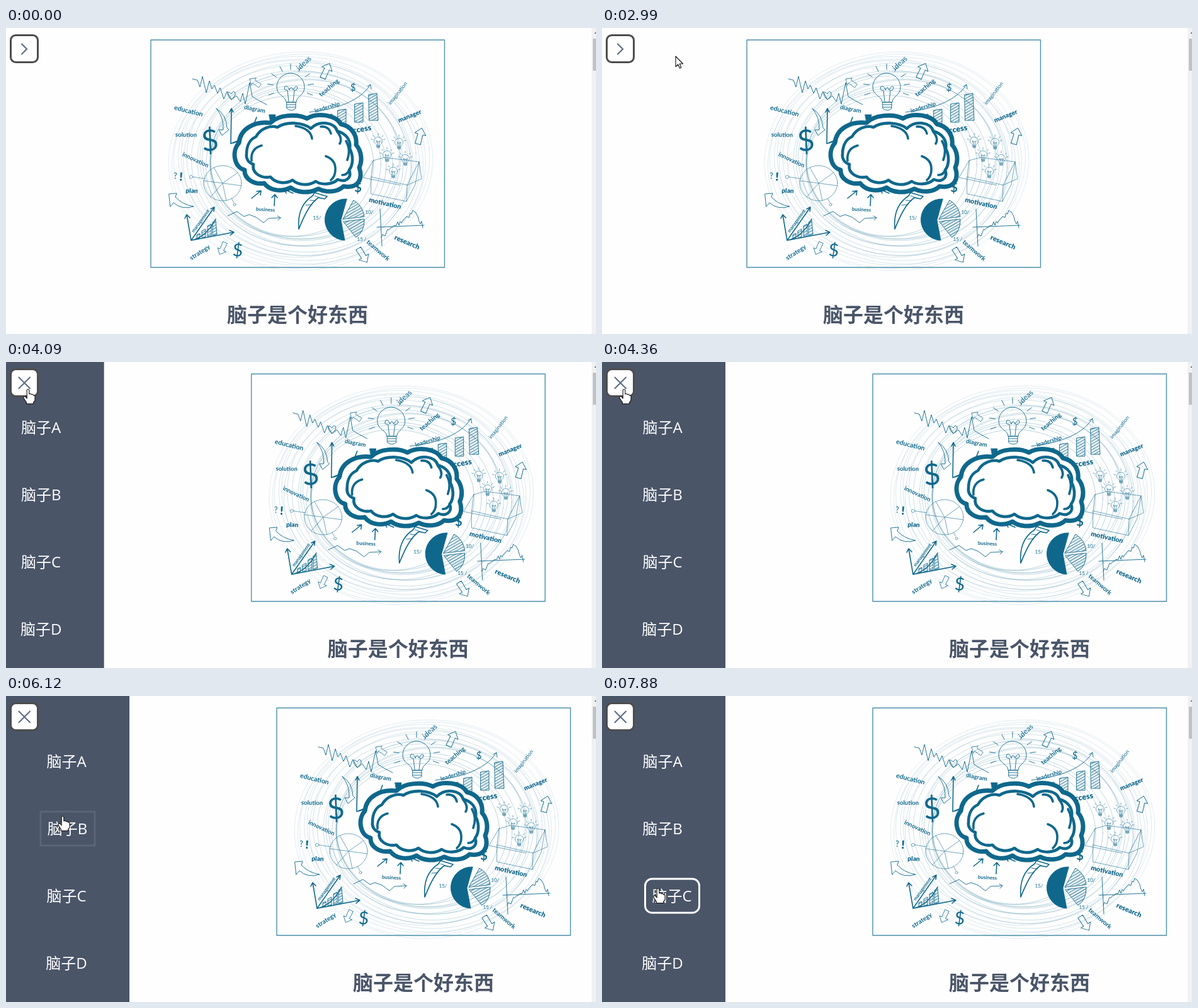
Recreate the animation shown at these times as an HTML page. Size 937x487 px, loop 8000 ms.

```html
<!DOCTYPE html>
<html lang="zh">
<head>
<meta charset="utf-8">
<title>脑子是个好东西</title>
<style>
html, body { margin: 0; width: 100%; height: 100%; overflow: hidden; background: #fefefe; }
svg { display: block; }
text { font-family: "Open Sans", "Noto Sans CJK SC", "Noto Sans CJK", sans-serif; }
#sketch { fill: none; stroke: #0f688c; stroke-width: .9; stroke-linejoin: round; stroke-linecap: round; }
#sketch text { font-family: Lato, sans-serif; fill: #0f688c; stroke: none; text-anchor: middle; }
.light { opacity: .65; }
.bold { stroke-width: 1.6; }
.solid { fill: #0f688c; }
.hatch { fill: url(#hatch); }
.item text { fill: #fff; font-size: 24px; text-anchor: middle; }
.item rect { fill: none; stroke: #fff; stroke-width: 3; }
#cursor path { fill: #fff; stroke: #111; stroke-width: 1.1; stroke-linejoin: round; }
</style>
</head>
<body>
<svg width="937" height="487" viewBox="0 0 937 487">
  <defs>
    <pattern id="hatch" width="4" height="4" patternUnits="userSpaceOnUse" patternTransform="rotate(-30)">
      <path d="M0 2H4" stroke="#0f688c" stroke-width="1"/>
    </pattern>
    <path id="block" d="M0-14L9-4L4-4L4.5 12L-4.5 12L-4-4L-9-4Z"/>
    <g id="bulb">
      <path d="M-7 24C-7 14-22 14-22 0A22 22 0 0 1 22 0C22 14 9 14 9 24Z"/>
      <path d="M-6 24H8V34Q1 40-6 34ZM-6 28H8M-6 32H8"/>
      <path d="M-3 23L-5 5Q-12 6-9-1Q-4-3-2 5Q1-4 4 5Q8-4 11 0Q11 6 6 5L4 23"/>
    </g>
  </defs>

  <g id="page">
    <g id="sketch">
      <g id="rings" stroke-width=".8"></g>
      <rect x="230" y="19" width="466.5" height="362" stroke="#4b90a9" stroke-width="1.4"/>

      <path d="M296 81L304 83L308 94L312 77L318 103L323 84L327 97L331 91L336 104L340 95L346 113L351 101L358 114Q367 106 363 102Q360 100 358 105Q352 99 352 105Q352 109 358 114L366 108L372 117L376 104L380 121L387 87L391 109L399 114L414 122"/>
      <path d="M334 128Q350 138 351 159L354 162L343 171L338 162L345 162Q346 142 334 128Z"/>
      <path d="M259 264L271 263L269 269Q280 281 298 284Q279 290 266 278L261 284Z"/>
      <path class="bold" d="M465 320C463 296 470 278 487 267L490 262L510 268L506 272L496 270C482 280 473 300 465 320Z"/>
      <path d="M476 282L486 281M482 274L492 275M490 267L501 271"/>

      <use href="#bulb" x="452" y="94"/>
      <g id="rays"></g>
      <g id="bulbs" class="light"></g>
      <path class="light" d="M580 237L637 250L636 276L580 264ZM637 250L656 213L650 249L636 276M580 237L583 211L601 206L656 213M583 211L567 238L626 250M656 213L660 240L637 250"/>

      <path class="bold" d="M357 184L358 128L355 134M358 128L361 134M357 184L384 173M361 183Q386 176 398 142"/>
      <path class="solid" d="M418 138H428L426 149H420Z"/>
      <path class="hatch" d="M510 138L518 137V155H510ZM527 131L540 129V152H527ZM554 121L567 119V150H554ZM576 106L589 104L591 147H577Z"/>
      <path d="M482 134Q556 126 579 90L574 93M579 90L580 97"/>

      <g class="light">
        <ellipse cx="344" cy="247" rx="30" ry="28"/>
        <path d="M344 247L330 222M344 247L368 230M344 247L374 251M344 247L350 275M344 247L325 269M344 247L314 243M297 237L316 240M358 271L362 278"/>
        <circle cx="294" cy="237" r="2.5"/><circle cx="363" cy="281" r="2"/>
      </g>
      <path class="bold" d="M390 271L405 259M398 260L405 259L404 266M426 283L427 265M422 270L427 265L431 270M456 263L442 257M448 256L442 257L445 263"/>
      <path d="M352 299L367 292L378 300L386 297L397 301L409 310L417 303L436 302M431 299L436 302L432 306"/>

      <path class="solid" d="M541 272A33 33 0 1 0 538 338L532 306Z"/>
      <path class="hatch" d="M535 304L552 274Q567 283 569 300ZM536 308L569 304Q570 324 556 333Z"/>

      <path d="M594 288L597 347M589 317L664 314"/>
      <path id="noise"/>
      <path class="bold" d="M294 338L287 297L284 303M287 297L292 302M294 338L362 325L355 322M362 325L356 330M294 338L331 285L325 288M331 285L330 292M294 338Q318 333 333 304"/>
      <path class="hatch" d="M303 335V329L308 327V334ZM311 333V323L317 320V332ZM320 331V315L326 312V330ZM328 330V309L333 306L335 328Z"/>

      <g id="blocks"></g>
      <g id="words"></g>

      <path fill="#fff" stroke-width="7" d="M370 183C372 160 395 148 420 151C432 138 462 136 478 144C494 134 524 138 532 153C548 156 558 170 556 186C565 196 566 212 561 222C567 240 560 256 536 252C526 262 508 262 496 256C480 264 462 262 452 254C436 262 418 258 410 247C394 250 378 240 379 226C362 222 358 196 370 183Z"/>
      <path stroke-width="4.6" d="M382 201C382 184 390 176 397 173C404 160 420 154 431 158C446 148 472 150 484 160C498 146 522 150 526 164C540 168 548 178 546 192C553 206 550 220 545 226C550 240 538 246 527 241C518 250 500 250 492 244C480 252 464 250 455 242C444 249 428 247 420 237C404 240 390 230 393 217C384 214 381 207 382 201Z"/>
      <path stroke-width="3.6" d="M390 211Q388 192 406 187M460 156Q484 160 486 176M500 157Q513 156 516 168M526 165Q535 176 530 184M540 180Q548 194 542 210M508 204Q524 210 523 226Q523 236 516 242M545 226Q542 234 534 234"/>
    </g>
    <text x="463" y="468" font-size="32" font-weight="700" fill="#4a5568" text-anchor="middle">脑子是个好东西</text>
  </g>

  <g id="side"><rect width="196" height="487" fill="#4a5568"/></g>

  <rect x="7.5" y="11.5" width="43" height="43" rx="8" fill="#fff" stroke="#4d4d4d" stroke-width="3"/>
  <path id="icon" fill="none" stroke="#5f6f86" stroke-width="2.2" stroke-linecap="round"/>

  <rect x="930" width="7" height="487" fill="#f1f1f1"/>
  <rect x="932" y="17" width="5" height="51" fill="#c1c1c1"/>
  <path d="M934 9L937 6V9Z" fill="#777"/>

  <g id="cursor">
    <path id="arrow" d="M0 0V16.5L3.8 13L6.4 19L8.8 18L6.3 12H11.5Z"/>
    <path id="hand" d="M-1.8 13V1.6Q0-1 1.8 1.6V8Q4 6.6 5.2 8.8Q7.4 7.6 8.4 10Q11 9.4 11 12V17Q11 20 8.6 21V23.5H-2.6V21Q-5 18-6.8 14.5Q-8 11.5-5.4 11.6Q-3.6 12-1.8 15Z"/>
  </g>
</svg>
<script>
const $ = id => document.getElementById(id);
const LOOP = 8000;

let seed = 7;
const rand = () => (seed = (seed * 16807) % 2147483647) / 2147483647;
const jitter = r => (rand() * 2 - 1) * r;

// Static drawing
function drawRings() {
  let out = '';
  for (let i = 0; i < 17; i++) {
    const k = i / 16, cx = 468 + jitter(14 * (1 - k)), cy = 212 + jitter(9 * (1 - k));
    out += `<ellipse cx="${cx}" cy="${cy}" rx="${130 + 80 * k}" ry="${112 + 62 * k}"
      opacity="${.34 - .2 * k}" transform="rotate(${jitter(9)} ${cx} ${cy})"/>`;
  }
  $('rings').innerHTML = out;
}

function drawRays() {
  let d = '';
  for (let a = -200; a <= 20; a += 27.5) {
    const c = Math.cos(a * Math.PI / 180), s = Math.sin(a * Math.PI / 180);
    d += `M${452 + 28 * c} ${94 + 28 * s}L${452 + 37 * c} ${94 + 37 * s}`;
  }
  $('rays').innerHTML = `<path d="${d}"/>`;
}

function drawBulbs() {
  const rays = 'M-28-8L-37-11M-20-22L-27-30M0-30V-40M20-22L27-30M28-8L37-11';
  $('bulbs').innerHTML = [[591, 180], [624, 182], [605, 202], [634, 208], [615, 228]].map(([x, y]) =>
    `<g transform="translate(${x} ${y}) scale(.3)" stroke-width="3"><use href="#bulb"/><path d="${rays}"/></g>`).join('');
}

function drawNoise() {
  let d = 'M596 333';
  for (let x = 598; x < 664; x += 2) {
    const y = x < 648 ? 330 - (x - 598) * .78 : 291 + (x - 648) * 1.7;
    d += `L${x} ${y + jitter(5)}`;
  }
  $('noise').setAttribute('d', d);
}

function drawBlocks() {
  $('blocks').innerHTML = [
    [396, 87, -55, .75], [508, 69, 25, 1], [657, 173, 15, 1], [344, 350, 205, .8], [566, 361, 148, 1]
  ].map(([x, y, r, s]) => `<use href="#block" transform="translate(${x} ${y}) rotate(${r}) scale(${s})"/>`).join('');
}

function drawWords() {
  // text, centre x, centre y, angle, size, weight
  $('words').innerHTML = [
    ['ideas', 473, 56, -43, 12, 400], ['teaching', 513, 95, -40, 10, 700],
    ['leadership', 510, 126, -17, 9, 700], ['imagination', 622, 104, -52, 8.5, 400],
    ['diagram', 395, 129, 11, 9.5, 700], ['education', 290, 132, 14, 10.5, 700],
    ['solution', 286, 170, 1, 9.5, 700], ['innovation', 301, 210, 25, 9.5, 700],
    ['?', 269, 236, 0, 13, 400], ['!', 278, 237, 4, 18, 900],
    ['plan', 295, 259, 2, 10, 900], ['management', 309, 307, -54, 7.5, 700],
    ['strategy', 308, 357, -33, 10, 700], ['business', 412, 289, 3, 8, 700],
    ['success', 559, 162, -10, 12.5, 900], ['manager', 641, 140, -22, 10, 900],
    ['motivation', 602, 279, 13, 10.5, 900], ['research', 637, 341, 23, 11, 900],
    ['teamwork', 591, 354, 41, 10, 700],
    ['10/', 577, 293, 0, 8, 400], ['15/', 494, 302, 0, 8, 400], ['15 /', 565, 336, 0, 8, 400],
    ['$', 324, 180, -6, 47, 400], ['$', 368, 354, 4, 28, 400],
    ['$', 551, 95, 5, 16, 400], ['$', 559, 254, 0, 20, 700]
  ].map(([s, x, y, r, size, w]) =>
    `<text transform="translate(${x} ${y}) rotate(${r})" y="${size * .33}" font-size="${size}" font-weight="${w}">${s}</text>`).join('');
}

const items = [...'ABCD'].map((letter, i) => {
  const g = document.createElementNS('http://www.w3.org/2000/svg', 'g');
  g.setAttribute('class', 'item');
  g.innerHTML = `<rect x="53.5" y="${77 + 107 * i}" width="86" height="54"/>
    <text x="96" y="${113 + 107 * i}">脑子${letter}</text>`;
  $('side').append(g);
  return g;
});

// Motion tables
const STEPS = [0,
  1320, 1470, 1610, 1760, 1900, 2050, 2200, 2340,
  2480, 2610, 2740, 2860, 2990, 3140, 3270, 3410,
  3540, 3810, 3940, 4090, 4220, 4360,
  4610, 4760, 4900, 5040, 5180, 5330, 5470, 5610,
  5730, 5860, 5990, 6120, 6270, 6400, 6540, 6670,
  6810, 6940, 7070, 7200, 7330, 7460, 7590];
const PATH = [
  [1320, 617, 457], [2340, 341, 206], [2990, 117, 45], [3410, 44, 37], [3540, 35, 43], [4360, 35, 43],
  [4610, 46, 53], [4900, 76, 82], [5330, 88, 108], [5610, 90, 138], [5990, 90, 172],
  [6120, 90, 191], [6400, 89, 214], [6670, 90, 249], [7070, 89, 291], [7200, 89, 306]];
const HOVERS = [[4850, 5590], [6070, 6640], [7060, LOOP]];
const OPEN = 3842, CLICK = 3810, FADE = 500;

// CSS "ease" curve
function ease(x) {
  if (x <= 0) return 0;
  if (x >= 1) return 1;
  const curve = (a, b, u) => 3 * a * u * (1 - u) ** 2 + 3 * b * u * u * (1 - u) + u ** 3;
  let lo = 0, hi = 1;
  for (let i = 0; i < 20; i++) {
    const mid = (lo + hi) / 2;
    if (curve(.25, .25, mid) < x) lo = mid; else hi = mid;
  }
  return curve(.1, 1, lo);
}

function cursorAt(t) {
  const i = PATH.findIndex(p => p[0] > t);
  if (i < 0) return PATH[PATH.length - 1].slice(1);
  const [t0, x0, y0] = PATH[Math.max(0, i - 1)], [t1, x1, y1] = PATH[i];
  const k = (t - t0) / (t1 - t0);
  return [x0 + (x1 - x0) * k, y0 + (y1 - y0) * k];
}

function render(time) {
  const t = STEPS.findLast(s => s <= time);
  const shift = 200 * ease((t - OPEN) / FADE);
  $('page').setAttribute('transform', `translate(${shift})`);
  $('side').setAttribute('transform', `translate(${shift - 200})`);
  $('icon').setAttribute('d', t < CLICK ? 'M25 25.5L33 33.5L25 41.5' : 'M20.5 24.5L38 42M38 24.5L20.5 42');

  items.forEach((g, i) => {
    const [on, off] = HOVERS[i] || [LOOP, LOOP];
    const p = ease((t - on) / FADE) - ease((t - off) / FADE);
    g.setAttribute('transform', `translate(${15 * p})`);
    g.firstChild.setAttribute('rx', 11 * p);
    g.firstChild.setAttribute('stroke-opacity', p);
  });

  const [x, y] = cursorAt(t);
  const hand = t >= 3540 && t < 4760 || HOVERS.some(([on, off]) => t >= on && t < off);
  $('cursor').setAttribute('transform', `translate(${x} ${y})`);
  $('cursor').setAttribute('visibility', t < 1320 ? 'hidden' : 'visible');
  $('arrow').setAttribute('display', hand ? 'none' : 'inline');
  $('hand').setAttribute('display', hand ? 'inline' : 'none');
}

[drawRings, drawRays, drawBulbs, drawNoise, drawBlocks, drawWords].forEach(f => f());

const start = performance.now();
function tick() {
  render((performance.now() - start) % LOOP);
  requestAnimationFrame(tick);
}
tick();
</script>
</body>
</html>
```
